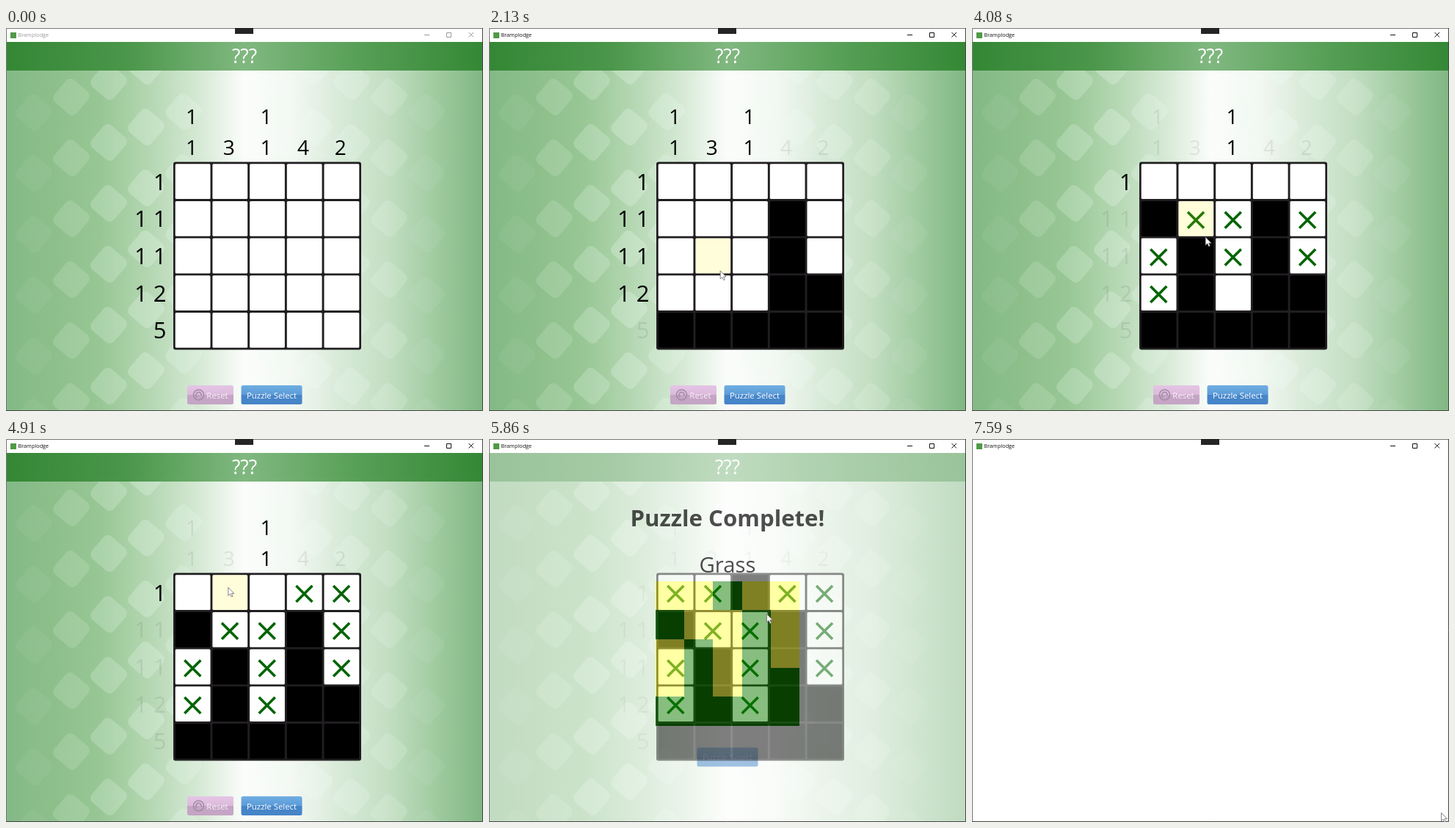
An HTML page with a canvas that plays this animation: 650 px wide and 522 px high, repeating every 7.62 s.

```html
<!DOCTYPE html>
<html lang="en">
<head>
<meta charset="utf-8">
<title>Picture puzzle</title>
<style>
html, body { margin: 0; width: 100%; height: 100%; overflow: hidden; background: #fff; }
canvas { display: block; }
</style>
</head>
<body>
<canvas id="stage" width="650" height="522"></canvas>
<script>
const W = 650, H = 522, LOOP = 7620, DONE = 5650, LEAVE = 7310;
const FONT = '"Open Sans", "Noto Sans", sans-serif';
const PITCH = 50.7, LAG = 40;
const solution = ['00100', '10010', '01010', '01011', '11111'];
const colClues = ['11', '3', '11', '4', '2'];
const rowClues = ['1', '1 1', '1 1', '1 2', '5'];
const line = [...solution.keys()];

const clamp = v => Math.max(0, Math.min(1, v));

// The board reacts slightly later than the pointer moves, hence LAG
const route = [], presses = [];
const move = (t, x, y) => route.push({ t, x, y });
const moveToCell = (t, i) => move(t, 254.6 + PITCH * (i % 5), 209 + PITCH * Math.floor(i / 5));
const press = (kind, from, to) => presses.push({ kind, from, to });

function drag(kind, from, to, first, last = first) {
  press(kind, from, to);
  moveToCell(from - LAG, first);
  moveToCell(to - LAG, last);
}

move(120, 655, 525);
drag('fill', 480, 880, 20, 24);
move(1000, 486, 395);
drag('fill', 1150, 1210, 19);
move(1390, 414, 361);
drag('fill', 1660, 1920, 18, 8);
move(2130, 315, 331);
drag('fill', 2200, 2390, 11, 16);
drag('fill', 2660, 2730, 5);
drag('cross', 2890, 2950, 15);
drag('cross', 3110, 3170, 10);
drag('cross', 3200, 3440, 12, 14);
move(3250, 388, 331);
move(3300, 402, 340);
drag('cross', 3640, 4060, 9, 6);
drag('cross', 4310, 4370, 17);
drag('cross', 4650, 4790, 4, 3);
move(4910, 302, 201);
drag('cross', 4960, 5100, 1, 0);
move(5200, 310, 124);
drag('fill', 5350, 5400, 2);
move(5420, 366, 258);
move(DONE, 366, 258);
move(5860, 378, 238);
move(6260, 385, 290);
move(6520, 385, 290);
move(7000, 332, 436);
press('fill', 7200, 7265);
move(7280, 330, 437);
move(7590, 639, 509);
route.sort((a, b) => a.t - b.t);

const held = t => presses.find(p => t >= p.from && t < p.to)?.kind;

function pointer(t) {
  const next = route.findIndex(p => p.t > t);
  if (next < 0) return route[route.length - 1];
  if (!next) return route[0];
  const a = route[next - 1], b = route[next], k = (t - a.t) / (b.t - a.t);
  return { x: a.x + (b.x - a.x) * k, y: a.y + (b.y - a.y) * k };
}

function cellAt(t) {
  const { x, y } = pointer(t - LAG);
  const c = Math.floor((x - 229.5) / PITCH), r = Math.floor((y - 184.5) / PITCH);
  return c >= 0 && c < 5 && r >= 0 && r < 5 ? r * 5 + c : -1;
}

// Replay the input once: marks[cell] = { kind, t }
const marks = {};
for (let t = 0; t < DONE; t += 10) {
  const kind = held(t), cell = cellAt(t);
  if (kind && cell >= 0 && !marks[cell]) marks[cell] = { kind, t };
}

// The last clues only fade once the whole puzzle is complete
function solvedAt(cells) {
  const times = cells.filter(i => solution[Math.floor(i / 5)][i % 5] === '1')
    .map(i => marks[i] ? marks[i].t : DONE);
  const last = Math.max(...times);
  return last > 5300 ? DONE : last;
}
const rowSolved = line.map(r => solvedAt(line.map(c => r * 5 + c)));
const colSolved = line.map(c => solvedAt(line.map(r => r * 5 + c)));

const g = document.getElementById('stage').getContext('2d');

function layer() {
  const c = document.createElement('canvas');
  c.width = W;
  c.height = H;
  return c.getContext('2d');
}

function text(str, x, y, size, color, align = 'center', weight = 400) {
  g.font = `${weight} ${size}px ${FONT}`;
  g.textAlign = align;
  g.fillStyle = color;
  g.fillText(str, x, y);
}

function box(ctx, x, y, w, h, r, color) {
  ctx.fillStyle = color;
  ctx.beginPath();
  ctx.roundRect(x, y, w, h, r);
  ctx.fill();
}

function strokes(ctx, color, width, path) {
  ctx.strokeStyle = color;
  ctx.lineWidth = width;
  ctx.stroke(new Path2D(path));
}

// Evenly spaced colours across the stage
function across(ctx, colors) {
  const list = colors.split(' '), f = ctx.createLinearGradient(0, 0, W, 0);
  list.forEach((color, i) => f.addColorStop(i / (list.length - 1), color));
  return f;
}

function paintBackdrop() {
  const b = layer();
  b.fillStyle = across(b, '#83b986 #8dbf8b #98c795 #b4d7b2 #d4e8d3 #fbfdfb ' +
    '#f3f8f3 #d8ead8 #c3dec3 #a0cba0 #80b783');
  b.fillRect(0, 0, W, H);
  for (let k = 0; k < 5; k++) {
    b.globalAlpha = 0.05 + 0.2 * Math.sin(k * Math.PI / 6);
    for (const x of [38 + 51 * k, 573 - 51 * k]) {
      for (let y = 32 - 21 * k; y < H + 40; y += 83) {
        b.save();
        b.translate(x, y);
        b.rotate(Math.PI / 4 - 0.08);
        box(b, -20, -20, 40, 40, 8, '#eefaf2');
        b.restore();
      }
    }
  }
  b.globalAlpha = 1;
  b.fillStyle = across(b, '#348735 #4a964a #80b880 #559e55 #348835');
  b.fillRect(0, 19, W, 39);
  return b.canvas;
}
const backdrop = paintBackdrop();
const board = layer();

function button(x, y, w, label, labelX, top, mid, low, ink) {
  const f = g.createLinearGradient(0, y, 0, y + 26);
  f.addColorStop(0, top);
  f.addColorStop(0.5, mid);
  f.addColorStop(0.52, low);
  f.addColorStop(1, low);
  box(g, x, y, w, 26, 2.5, f);
  text(label, labelX, y + 17.5, 11.4, ink);
}

const selectButton = (x, y) =>
  button(x, y, 83, 'Puzzle Select', x + 41.5, '#70aee2', '#5b9bd8', '#4685c8', '#fff');

function resetButton() {
  button(247, 487, 63, 'Reset', 288, '#e5c5e5', '#dcb9dc', '#c5a5c5', '#fbf3fb');
  g.strokeStyle = '#a08ca2';
  g.lineWidth = 1.6;
  g.beginPath();
  g.arc(262.5, 500, 7, 0, 7);
  g.moveTo(259.5, 503);
  g.arc(262.5, 500, 3.6, 2.4, 6.6);
  g.stroke();
}

function drawClues(t, alpha) {
  const fade = at => alpha * (1 - 0.92 * clamp((t - at) / 150));
  for (const i of line) {
    g.globalAlpha = fade(rowSolved[i]);
    text(rowClues[i], 218.5, 220.5 + PITCH * i, 31, '#000', 'right');
    g.globalAlpha = fade(colSolved[i]);
    [...colClues[i]].forEach((n, k, all) =>
      text(n, 253 + PITCH * i, 173 - 42 * (all.length - 1 - k), 28, '#000'));
  }
}

function drawBoard(t, alpha) {
  const hover = t < DONE ? cellAt(t) : -1;
  board.clearRect(0, 0, W, H);
  box(board, 228, 182.5, 256, 256, 3, '#211e21');
  for (let i = 0; i < 25; i++) {
    const mark = marks[i] && t >= marks[i].t ? marks[i].kind : '';
    board.save();
    board.translate(230.7 + PITCH * (i % 5), 185.2 + PITCH * Math.floor(i / 5));
    box(board, 0, 0, 47.8, 47.8, 1.5, mark === 'fill' ? '#000' : '#fff');
    if (mark === 'cross') strokes(board, '#006400', 3.6, 'M12.6 14.8l22 22m0-22l-22 22');
    if (i === hover) box(board, 0, 0, 47.8, 47.8, 1.5, 'rgba(255,240,0,.145)');
    board.restore();
  }
  g.globalAlpha = alpha;
  g.drawImage(board.canvas, 0, 0);
}

function drawResult(p, out) {
  const left = c => Math.round(226.7 + c * 39.3), top = r => Math.round(194 + r * 39.3);
  g.globalAlpha = out;
  for (const r of line) {
    for (const c of line) {
      g.fillStyle = solution[r][c] === '1' ? '#107c00' : '#ffff48';
      g.fillRect(left(c), top(r), left(c + 1) - left(c), top(r + 1) - top(r));
    }
  }
  g.globalAlpha = out * p;
  selectButton(283.5, 420.5);
  g.globalAlpha = out * clamp(p * 1.38);
  text('Puzzle Complete!', 325, 119, 31.2, '#000', 'center', 700);
  text('Grass', 325, 182, 29.3, '#000');
}

function drawChrome(active) {
  const ink = active ? '#111' : '#999';
  g.fillStyle = '#fff';
  g.fillRect(0, 0, W, 19);
  g.fillStyle = '#4f9a45';
  g.fillRect(6, 6, 8, 8);
  text('Bramplodge', 16.5, 12.3, 7.3, ink, 'left');
  strokes(g, ink, 1, 'M570 9.5h7M600.5 6.5h6v6h-6zM630.5 6l6.5 6.5m0-6.5l-6.5 6.5');
  strokes(g, '#777', 1, `M.5 ${H}V.5H${W}`);
  strokes(g, '#444', 1, `M${W - 0.5} 0V${H - 0.5}H0`);
  g.fillStyle = '#252525';
  g.fillRect(312, 0, 25, 8);
}

function drawPointer(t) {
  if (t < 120) return;
  const { x, y } = pointer(t), kind = held(t);
  if (kind) {
    g.fillStyle = kind === 'fill' ? 'rgba(255,255,0,.47)' : 'rgba(255,0,0,.47)';
    g.beginPath();
    g.arc(x, y, 8, 0, 7);
    g.fill();
  }
  const shape = 'M0 0V11.2L2.6 8.8L4.4 12.8L6.2 12L4.5 8.2H8Z';
  g.save();
  g.translate(x + 0.5, y + 0.5);
  g.fillStyle = '#fff';
  g.fill(new Path2D(shape));
  strokes(g, '#666', 0.8, shape);
  g.restore();
}

function draw(t) {
  const p = clamp((t - DONE) / 420), out = 1 - clamp((t - LEAVE) / 250);
  g.globalAlpha = 1;
  g.drawImage(backdrop, 0, 0);
  text('???', 325, 48, 26.5, '#fff');
  if (t < DONE) {
    resetButton();
    selectButton(320.5, 487);
  } else {
    g.globalAlpha = p;
    g.fillStyle = '#fff';
    g.fillRect(0, 0, W, H);
    drawResult(p, out);
  }
  if (p < 1) {
    drawClues(t, 1 - p);
    drawBoard(t, 1 - p);
  }
  g.globalAlpha = 1;
  drawChrome(t >= 480);
  drawPointer(t);
}

const start = performance.now();
function tick() {
  draw((performance.now() - start) % LOOP);
  requestAnimationFrame(tick);
}
tick();
</script>
</body>
</html>
```
